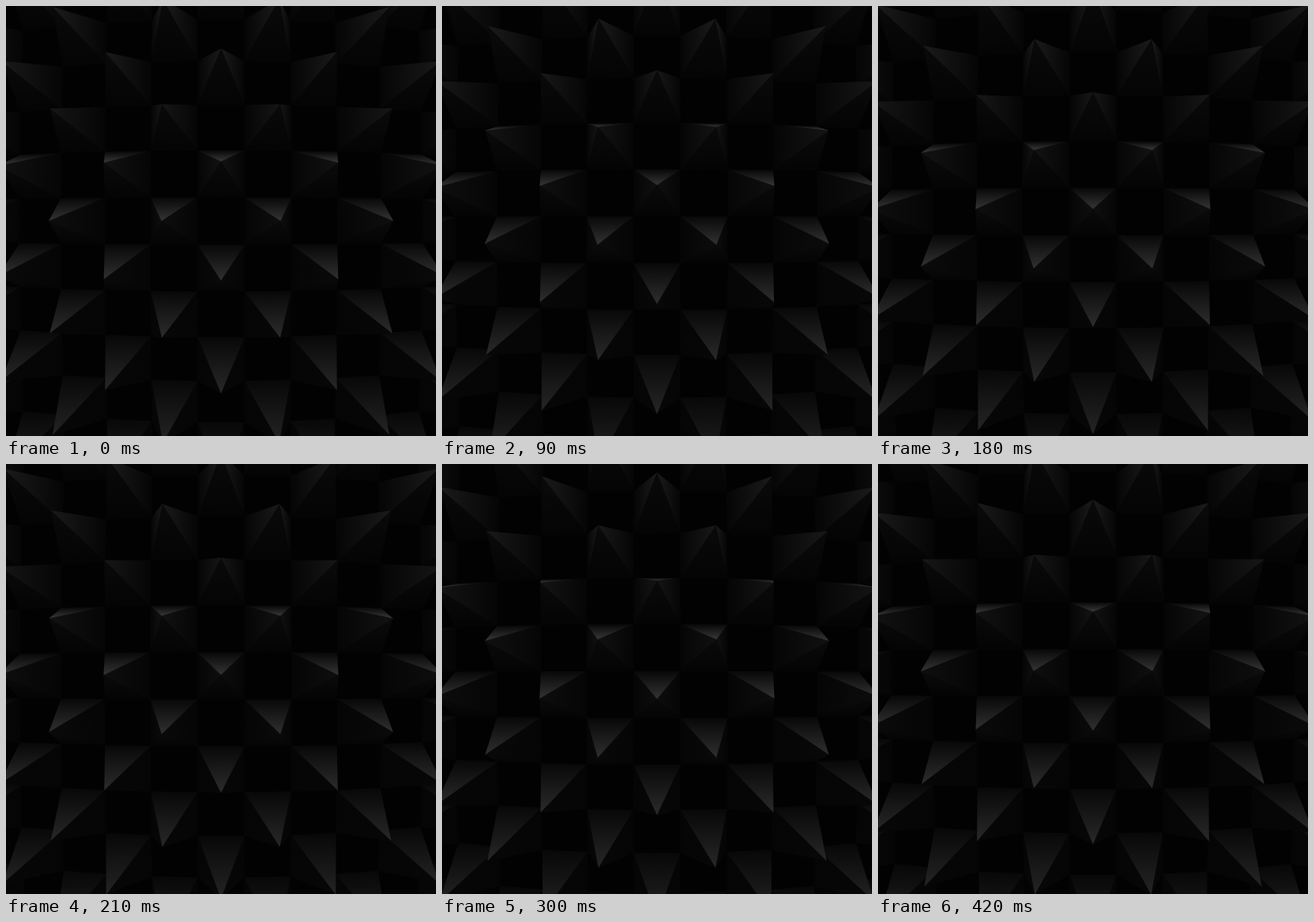
Animation, 500 px wide and 500 px high, one loop 0.45 s. Source, as an HTML page with a canvas:

```html
<!DOCTYPE html>
<html>
<head>
<meta charset="utf-8">
<title>Spikes</title>
<style>
  html, body { margin: 0; height: 100%; overflow: hidden; background: #020202; }
  canvas { display: block; }
</style>
</head>
<body>
<canvas id="stage" width="500" height="500"></canvas>
<script>
const ctx = document.getElementById('stage').getContext('2d');
const LOOP = 450, STEP = 30;
const TIP = 69.5;   // spacing of the tips on screen
const BASE = 55;    // spacing of the farther base squares

const clamp = (v, lo, hi) => Math.max(lo, Math.min(hi, v));
const grey = v => `rgb(${v},${v},${v})`;

// Perspective scale plus the slight bulge of the surface
function project(x, y, scale) {
  const px = x * scale, py = y * scale;
  const u = (px / TIP) ** 2, v = (py / TIP) ** 2;
  return [250 + px / (1 + 0.0045 * u + 0.0015 * v),
          250 + py / (1 + 0.005 * u + 0.0045 * v)];
}

function face(a, b, tip, horizontal, dark, light) {
  const turn = (b[0] - a[0]) * (tip[1] - a[1]) - (b[1] - a[1]) * (tip[0] - a[0]);
  if (turn <= 0) return;
  const mx = (a[0] + b[0]) / 2, my = (a[1] + b[1]) / 2;
  const fill = horizontal
    ? ctx.createLinearGradient(mx, 0, tip[0], 0)
    : ctx.createLinearGradient(0, my, 0, tip[1]);
  fill.addColorStop(0, grey(dark));
  fill.addColorStop(1, grey(light));
  ctx.fillStyle = fill;
  ctx.beginPath();
  for (const p of [a, b, tip]) ctx.lineTo(...p);
  ctx.fill();
}

function spike(x, y) {
  const tip = project(x, y, TIP);
  const corner = (dx, dy) => project(x + dx / 2, y + dy / 2, BASE);
  const nw = corner(-1, -1), ne = corner(1, -1), se = corner(1, 1), sw = corner(-1, 1);
  const side = clamp(14 - 4 * y, 7, 27);
  face(se, sw, tip, false, 4, 10);
  face(ne, se, tip, true, 5, side);
  face(sw, nw, tip, true, 5, side);
  face(nw, ne, tip, false, 8, clamp(52 - 4 * y, 34, 58));
}

function draw(now) {
  const time = Math.floor(now % LOOP / STEP) * STEP;
  const shift = 2 * time / LOOP;
  const spikes = [];
  for (let i = -5; i <= 5; i++)
    for (let j = -8; j <= 6; j++)
      if ((i + j) & 1) spikes.push([i, j + shift]);
  // Inner spikes lean over the outer ones
  spikes.sort((a, b) => Math.hypot(...b) - Math.hypot(...a));
  ctx.fillStyle = '#020202';
  ctx.fillRect(0, 0, 500, 500);
  for (const s of spikes) spike(...s);
}

const start = performance.now();
function frame() {
  draw(performance.now() - start);
  requestAnimationFrame(frame);
}
frame();
</script>
</body>
</html>
```
